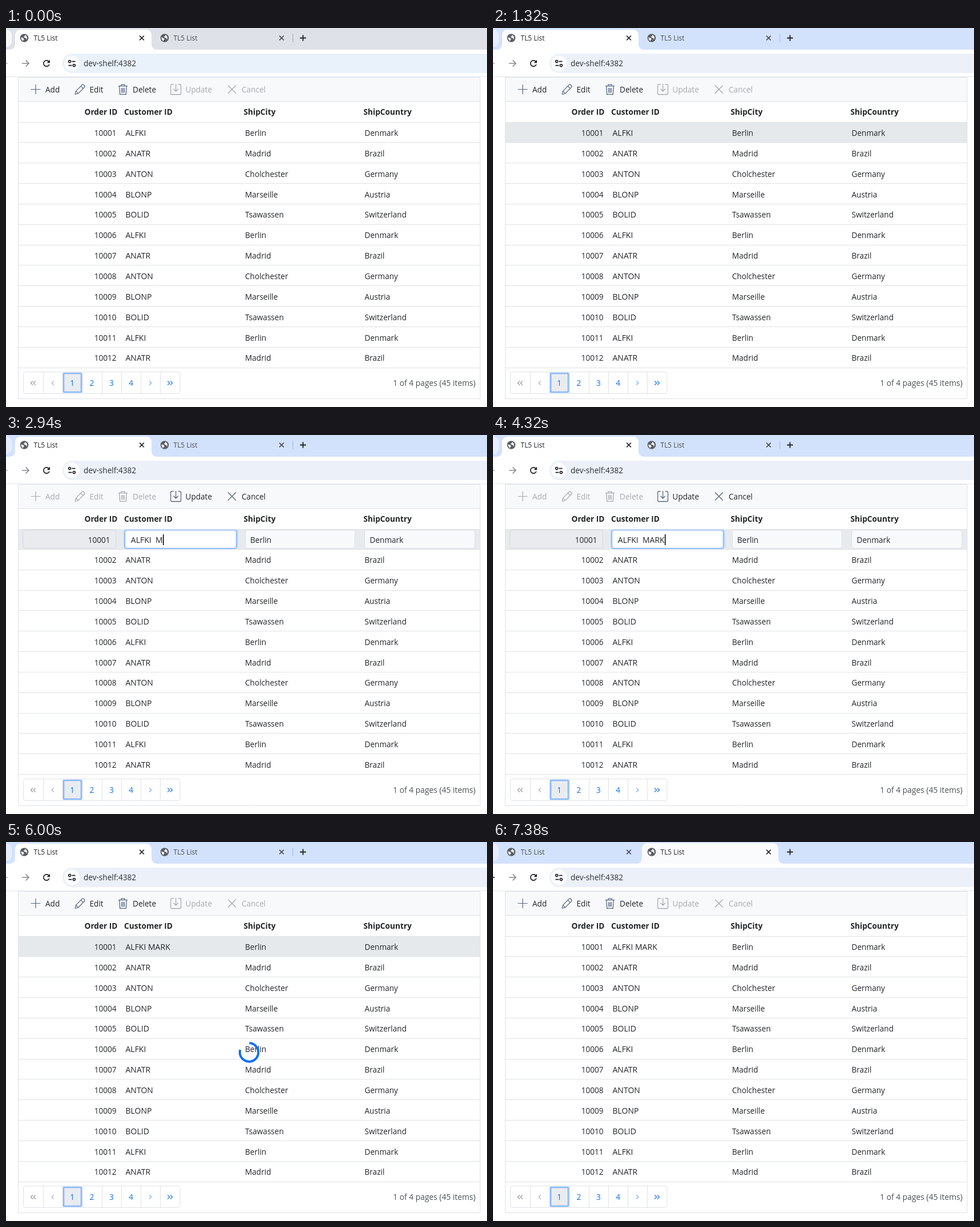
An HTML page with a canvas for the animation above (8 s loop, 843 px wide and 664 px high).

```html
<!DOCTYPE html>
<html lang="en">
<head>
<meta charset="utf-8">
<title>Grid editing</title>
<style>
html, body { margin: 0; width: 100%; height: 100%; overflow: hidden; background: #fff; }
canvas { display: block; width: 843px; height: 664px; }
</style>
</head>
<body>
<canvas id="stage" width="843" height="664"></canvas>
<script>
const ctx = document.getElementById('stage').getContext('2d');
const LOOP = 8000, PITCH = 35.84;
const FAMILY = '"Open Sans", "Noto Sans", sans-serif';
const INK = '#212529', LINE = '#dee2e6', BLUE = '#0d6efd', OFF = '#a6abb0', ICON = '#5a6784';
const CUSTOMERS = ['ALFKI', 'ANATR', 'ANTON', 'BLONP', 'BOLID'];
const CITIES = ['Berlin', 'Madrid', 'Cholchester', 'Marseille', 'Tsawassen'];
const COUNTRIES = ['Denmark', 'Brazil', 'Germany', 'Austria', 'Switzerland'];
const TYPED = [[1380, 'ALFKI '], [2640, 'ALFKI  '], [2940, 'ALFKI  M'],
  [3660, 'ALFKI  MA'], [3960, 'ALFKI  MAR'], [4320, 'ALFKI  MARK']];
const CARET_OFF = [[1860, 2400], [3420, 3660], [4800, 5400]];

function rect(x, y, w, h, color) {
  ctx.fillStyle = color;
  ctx.fillRect(x, y, w, h);
}

function box(x, y, w, h, r, fill, stroke, width = 1) {
  ctx.beginPath();
  ctx.roundRect(x, y, w, h, r);
  if (fill) { ctx.fillStyle = fill; ctx.fill(); }
  if (stroke) { ctx.strokeStyle = stroke; ctx.lineWidth = width; ctx.stroke(); }
}

function disc(x, y, r, color) {
  ctx.beginPath();
  ctx.arc(x, y, r, 0, Math.PI * 2);
  ctx.fillStyle = color;
  ctx.fill();
}

function text(str, x, y, color = INK, size = 13.6, align = 'left', weight = 400) {
  ctx.font = `${weight} ${size}px ${FAMILY}`;
  ctx.textAlign = align;
  ctx.fillStyle = color;
  ctx.fillText(str, x, y);
}

// Each path is a flat list of x, y pairs
function strokes(color, width, ...paths) {
  ctx.strokeStyle = color;
  ctx.lineWidth = width;
  ctx.beginPath();
  for (const p of paths) {
    ctx.moveTo(p[0], p[1]);
    for (let i = 2; i < p.length; i += 2) ctx.lineTo(p[i], p[i + 1]);
  }
  ctx.stroke();
}

function cross(x, y, r, color, width) {
  strokes(color, width, [x - r, y - r, x + r, y + r], [x + r, y - r, x - r, y + r]);
}

function plus(x, y, r, color, width) {
  strokes(color, width, [x - r, y, x + r, y], [x, y - r, x, y + r]);
}

function mix(a, b, k) {
  return `rgb(${a.map((v, i) => Math.round(v + (b[i] - v) * k))})`;
}

function globe(x, y) {
  disc(x, y, 7.3, '#585d63');
  ctx.fillStyle = '#fff';
  ctx.beginPath();
  ctx.moveTo(x - 5.6, y - 1);
  ctx.quadraticCurveTo(x - 2, y - 0.6, x - 0.4, y + 1.4);
  ctx.quadraticCurveTo(x + 0.4, y + 3, x - 2, y + 3.6);
  ctx.lineTo(x - 1.6, y + 5.4);
  ctx.quadraticCurveTo(x - 5.4, y + 4, x - 5.6, y - 1);
  ctx.moveTo(x + 1.4, y - 5.4);
  ctx.lineTo(x + 0.8, y - 3.2);
  ctx.lineTo(x - 1.6, y - 2);
  ctx.lineTo(x + 1, y - 0.6);
  ctx.lineTo(x + 3.4, y + 0.6);
  ctx.lineTo(x + 4, y + 3.6);
  ctx.quadraticCurveTo(x + 6.6, y - 2.4, x + 1.4, y - 5.4);
  ctx.fill();
}

function tabShape(l, r, top, color) {
  const b = 38, c = 9;
  ctx.fillStyle = color;
  ctx.beginPath();
  ctx.moveTo(l - c, b);
  ctx.arcTo(l, b, l, b - c, c);
  ctx.arcTo(l, top, l + c, top, c);
  ctx.arcTo(r, top, r, top + c, c);
  ctx.arcTo(r, b, r + c, b, c);
  ctx.fill();
}

function drawBrowser(t) {
  const focused = t >= 1320, second = t >= 7380;
  rect(0, 0, 843, 38, focused ? '#d3e2fc' : '#dee1e7');
  box(-20, 3, 30, 30, 9, focused ? '#e6eefd' : '#f7f8fa');

  if (second) {
    tabShape(261, 500, 2, '#fafbfc');
  } else {
    tabShape(16, 255, 3, '#fff');
    if (t >= 6780) {
      const k = Math.min(3, Math.floor((t - 6780) / 60) + 1) / 3;
      box(261, 3, 238, 28, 9, mix([211, 226, 252], [171, 200, 248], k));
    } else {
      rect(502, 10, 1.5, 15, focused ? '#a8c7fa' : '#b4b8be');
    }
  }
  const dim = '#464a4f', dark = '#1f2124';
  [[32, 48.5, 238, !second], [278, 293.5, 483, second]].forEach(([icon, label, close, on]) => {
    globe(icon, 17.5);
    text('TL5 List', label, 22, on ? dark : dim, 12);
    cross(close, 17.5, 3.9, on ? dark : dim, 1.5);
  });
  plus(520.5, 17.5, 5.2, dark, 1.8);

  rect(0, 38, 843, 47, '#fff');
  rect(0, 85, 843, 1, '#e3e7ec');
  strokes(second ? '#202124' : '#b4b7ba', 1.6, [0, 62, 3, 62]);
  strokes('#85898e', 1.6, [28, 62, 40, 62], [34.5, 56.5, 40, 62, 34.5, 67.5]);

  ctx.strokeStyle = dark;
  ctx.lineWidth = 1.7;
  ctx.beginPath();
  ctx.arc(71, 62, 5.2, 0.35, Math.PI * 2 - 0.75);
  ctx.stroke();
  ctx.fillStyle = dark;
  ctx.beginPath();
  ctx.moveTo(77, 55.8);
  ctx.lineTo(77, 61.2);
  ctx.lineTo(71.6, 61.2);
  ctx.fill();

  const hoverOut = t < 120 ? 0 : t < 180 ? 0.5 : 1;
  box(99, 45, 800, 34, 17, mix([233, 241, 250], [235, 240, 249], hoverOut));
  disc(115.5, 62, 13.5, '#fcfdfe');
  strokes(dark, 1.6, [115.5, 58.6, 121.5, 58.6], [109.5, 65.6, 115.5, 65.6]);
  for (const [x, y] of [[111.6, 58.6], [119.4, 65.6]]) {
    ctx.beginPath();
    ctx.arc(x, y, 2, 0, Math.PI * 2);
    ctx.stroke();
  }
  text('dev-shelf:4382', 136, 67, '#2b2e32');
}

function drawToolbar(t, editing) {
  rect(22, 87, 809, 41, '#f8f9fb');
  rect(22, 128, 809, 1, LINE);
  const c = editing ? OFF : ICON, ink = editing ? OFF : INK;
  const hover = editing ? (t >= 5460 ? 1 : t >= 5400 ? 0.5 : 0) : 0;
  let u = editing ? ICON : OFF, uInk = editing ? INK : OFF;
  if (hover) {
    box(280, 91.5, 90, 33, 4, mix([248, 249, 251], [92, 99, 106], hover));
    u = uInk = '#fff';
  }

  plus(52, 107.5, 8.5, c, 1.2);
  text('Add', 69, 113, ink);

  strokes(c, 1.2,
    [121, 116.3, 122.6, 110.6, 133.6, 99.4, 135.3, 98.9, 138.2, 101.8, 137.8, 103.5, 126.6, 114.6, 121, 116.3],
    [131.2, 101.8, 135.4, 106], [122.6, 110.6, 126.6, 114.6]);
  text('Edit', 146.5, 113, ink);

  strokes(c, 1.3, [197, 101.6, 213, 101.6], [202, 101.4, 202, 99.2, 208, 99.2, 208, 101.4],
    [198.7, 102, 199.7, 116.3, 210.3, 116.3, 211.3, 102],
    [202.6, 105, 202.6, 113.5], [205, 105, 205, 113.5], [207.4, 105, 207.4, 113.5]);
  text('Delete', 222, 113, ink);

  strokes(u, 1.3, [294, 98.7, 290, 98.7, 288.7, 100, 288.7, 115.3, 290, 116.5, 305.3, 116.5, 306.6, 115.3,
    306.6, 100, 305.3, 98.7, 301.5, 98.7],
    [297.7, 98, 297.7, 110.8], [293.6, 106.8, 297.7, 111, 301.8, 106.8]);
  text('Update', 314.5, 113, uInk);

  cross(396, 107.5, 7, editing ? ICON : OFF, 1.3);
  text('Cancel', 413, 113, editing ? INK : OFF);
}

function drawEditor(t) {
  if (t < 5280) rect(22, 165, 809, 35, '#e8ebee');
  const base = 189;
  box(29.5, 166.5, 163, 32, 4, '#e9ebee', '#d3d7dc');
  text('10001', 182.5, base, INK, 13.6, 'right');

  box(206, 165, 200.5, 35, 5, '#b4d2fd');
  box(208.5, 166.5, 195, 32, 4, '#fff', '#86b7fe', 1.4);
  const value = TYPED.filter(step => t >= step[0]).pop()[1];
  text(value, 218.8, base, INK, 14);
  if (!CARET_OFF.some(([a, b]) => t >= a && t < b)) {
    rect(Math.round(218.8 + ctx.measureText(value).width), 174, 1.5, 19, '#000');
  }

  box(419.5, 166.5, 192, 32, 4, '#f8f9fb', '#d9dde2');
  text('Berlin', 428, base);
  box(628.5, 166.5, 193.5, 32, 4, '#f8f9fb', '#d9dde2');
  text('Denmark', 637.5, base);
}

function drawRows(t, editing) {
  const shift = editing ? 0.5 : 0;
  text('Order ID', 195.5, 152, INK, 13.7, 'right', 700);
  text('Customer ID', 207, 152, INK, 13.7, 'left', 700);
  text('ShipCity', 416.5, 152, INK, 13.7, 'left', 700);
  text('ShipCountry', 626.5, 152, INK, 13.7, 'left', 700);

  if (t >= 1320 && t < 6060 && !editing) rect(22, 165, 809, 36, '#e6e9ec');
  if (editing) drawEditor(t);
  for (let i = 0; i <= 12; i++) {
    rect(22, Math.floor(165 + PITCH * i - (i ? shift : 0)), 809, 1, LINE);
    if (i === 12 || (editing && !i)) continue;
    const y = Math.floor(189.6 + PITCH * i - shift), k = i % 5;
    const saved = !i && t >= 5940;
    text(String(10001 + i), 193.5, y, INK, 13.6, 'right');
    text(CUSTOMERS[k] + (saved ? ' MARK' : ''), 209.5, y, INK, 14);
    text(CITIES[k], 419, y);
    text(COUNTRIES[k], 628.5, y);
  }
}

function chevron(x, dir, color) {
  strokes(color, 1.2, [x - 1.8 * dir, 618.3, x + 1.8 * dir, 622, x - 1.8 * dir, 625.7]);
}

function drawPager() {
  box(30.5, 602.5, 274.5, 38, 4, '#fff', LINE);
  for (let i = 1; i < 8; i++) rect(Math.round(31 + 34.2 * i), 603, 1, 37, LINE);
  box(101, 605, 31, 33, 1, '#e9ecef', '#86b7fe', 2.6);
  for (let i = 0; i < 4; i++) text(String(i + 1), 116.2 + 34.3 * i, 627, BLUE, 13.6, 'center');
  chevron(45.2, -1, '#8d949b');
  chevron(50, -1, '#8d949b');
  chevron(82, -1, '#a9afb5');
  chevron(253, 1, '#6ea8fe');
  chevron(285, 1, BLUE);
  chevron(289.8, 1, BLUE);
  text('1 of 4 pages (45 items)', 822.8, 627, '#495057', 13.85, 'right');
}

function drawSpinner(t) {
  const turn = (t - 6000) / 750 * Math.PI * 2;
  ctx.strokeStyle = BLUE;
  ctx.lineWidth = 4;
  ctx.beginPath();
  ctx.arc(426, 368.5, 16.2, turn - 1.55, turn + 3.42);
  ctx.stroke();
}

function draw(t) {
  const editing = t >= 1380 && t < 5940;
  rect(0, 0, 843, 664, '#fff');
  drawBrowser(t);
  drawToolbar(t, editing);
  drawRows(t, editing);
  drawPager();
  box(21.5, 86.5, 809.5, 563, 0, null, LINE);
  if (t >= 5820 && t < 6060) drawSpinner(Math.floor(t / 60) * 60);
}

const start = performance.now();
function tick() {
  draw((performance.now() - start) % LOOP);
  requestAnimationFrame(tick);
}
tick();
</script>
</body>
</html>
```
